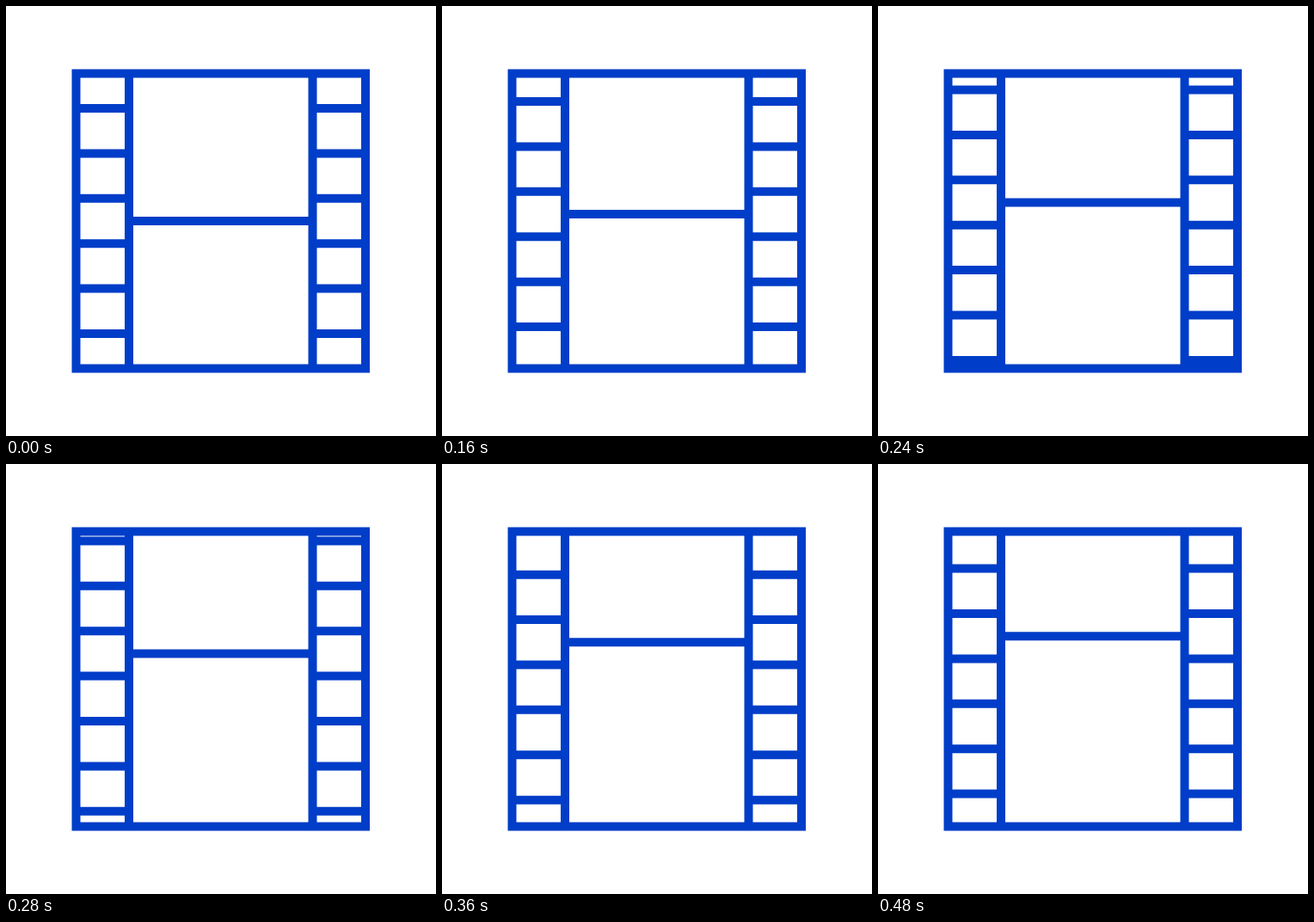
An HTML page for the animation above (0.52 s loop, 500 by 500 pixels).

```html
<!DOCTYPE html>
<html lang="en">
<head>
<meta charset="utf-8">
<title>Film strip</title>
<style>
  html, body { margin: 0; width: 100%; height: 100%; overflow: hidden; background: #fff; }
  svg { display: block; width: 100%; height: 100%; }
  path, rect { fill: none; stroke: #003dc8; stroke-width: 10; }
</style>
</head>
<body>
<svg viewBox="0 0 500 500">
  <clipPath id="window"><path d="M82 78H418V422H82Z"/></clipPath>
  <g clip-path="url(#window)"><path id="bars"/></g>
  <rect x="81.5" y="78.5" width="336.5" height="343"/>
  <path d="M143 78V422M356.5 78V422"/>
</svg>
<script>
  const STEP = 40, STEPS = 13, PHASE = 0.07, TRAVEL = 50, GAP = 52.4, POWER = 2.12;
  const bars = document.getElementById('bars');

  let d = 'M143 250H356';
  for (let i = 0; i < 7; i++) {
    const y = 119 + i * GAP;
    d += `M82 ${y}H143M356 ${y}H418`;
  }
  bars.setAttribute('d', d);

  // Symmetric ease-in-out
  function ease(x) {
    const a = x ** POWER, b = (1 - x) ** POWER;
    return a / (a + b);
  }

  function draw(now) {
    const step = Math.floor(now / STEP) % STEPS;
    const shift = TRAVEL * ease((step + PHASE) / STEPS);
    bars.setAttribute('transform', `translate(0 ${-shift})`);
    requestAnimationFrame(draw);
  }
  draw(0);
</script>
</body>
</html>
```
